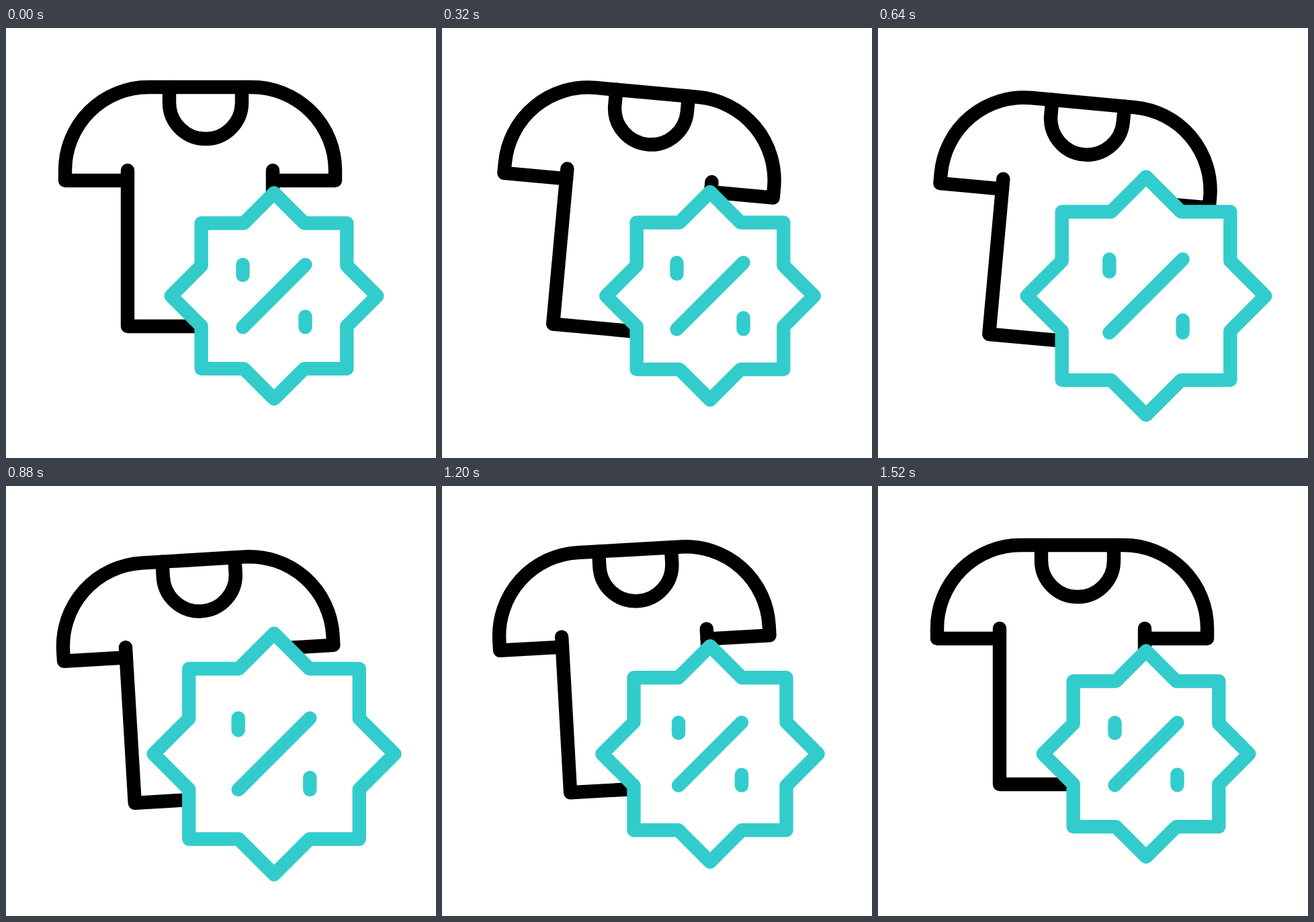
Write an HTML page without scripts that moves like this. It is 640 px wide and 640 px high and loops after 1.68 s.

```html
<!DOCTYPE html>
<html lang="en">
<head>
<meta charset="utf-8">
<title>Shirt discount</title>
<style>
  html, body { margin: 0; width: 100%; height: 100%; overflow: hidden; background: #fff; }
  svg { display: block; width: 640px; height: 640px; }

  path {
    fill: none;
    stroke-width: 20.4;
    stroke-linecap: round;
    stroke-linejoin: round;
    vector-effect: non-scaling-stroke;
  }
  .shirt { stroke: #000; transform-origin: 289px 266px; }
  .badge { stroke: #3cc; }
  .badge .star { fill: #fff; }

  .shirt, .star, .percent {
    animation: 1680ms cubic-bezier(.5, 0, .5, 1) infinite;
  }
  .shirt { animation-name: sway, dip; }
  .star { animation-name: grow-late; }
  .percent { animation-name: grow; }

  @keyframes sway {
    0%, 2.38% { rotate: 0deg; }
    28.87% { rotate: 7.05deg; }
    60.12% { rotate: -4.6deg; }
    88.69%, 100% { rotate: 0deg; }
  }
  @keyframes dip {
    0%, 2.38% { translate: 0 0; }
    44.05% { translate: 0 23px; }
    88.69%, 100% { translate: 0 0; }
  }
  @keyframes grow {
    0%, 2.38% { scale: 1; }
    40.77% { scale: 1.176; }
    78.57%, 100% { scale: 1; }
  }
  @keyframes grow-late {
    0%, 12.8% { scale: 1; }
    46.73% { scale: 1.176; }
    86.61%, 100% { scale: 1; }
  }
</style>
</head>
<body>
<svg viewBox="0 0 640 640">
  <g class="shirt">
    <path d="M181 227H88V212A124 124 0 0 1 212 88H366A124 124 0 0 1 490 212V227H397"/>
    <path d="M181 212V444H397V212"/>
    <path d="M243 88V111a54 54 0 0 0 108 0V88"/>
  </g>
  <g class="badge" transform="translate(399 398.8)">
    <path class="star" d="M0-153.3l45 45h63.3v63.3l45 45l-45 45v63.3h-63.3l-45 45l-45-45h-63.3v-63.3l-45-45l45-45v-63.3h63.3z"/>
    <path class="percent" d="M-46.5 46.5l93-93M-46.5-46.5v15.8M46.5 46.5v-15.8"/>
  </g>
</svg>
</body>
</html>
```
